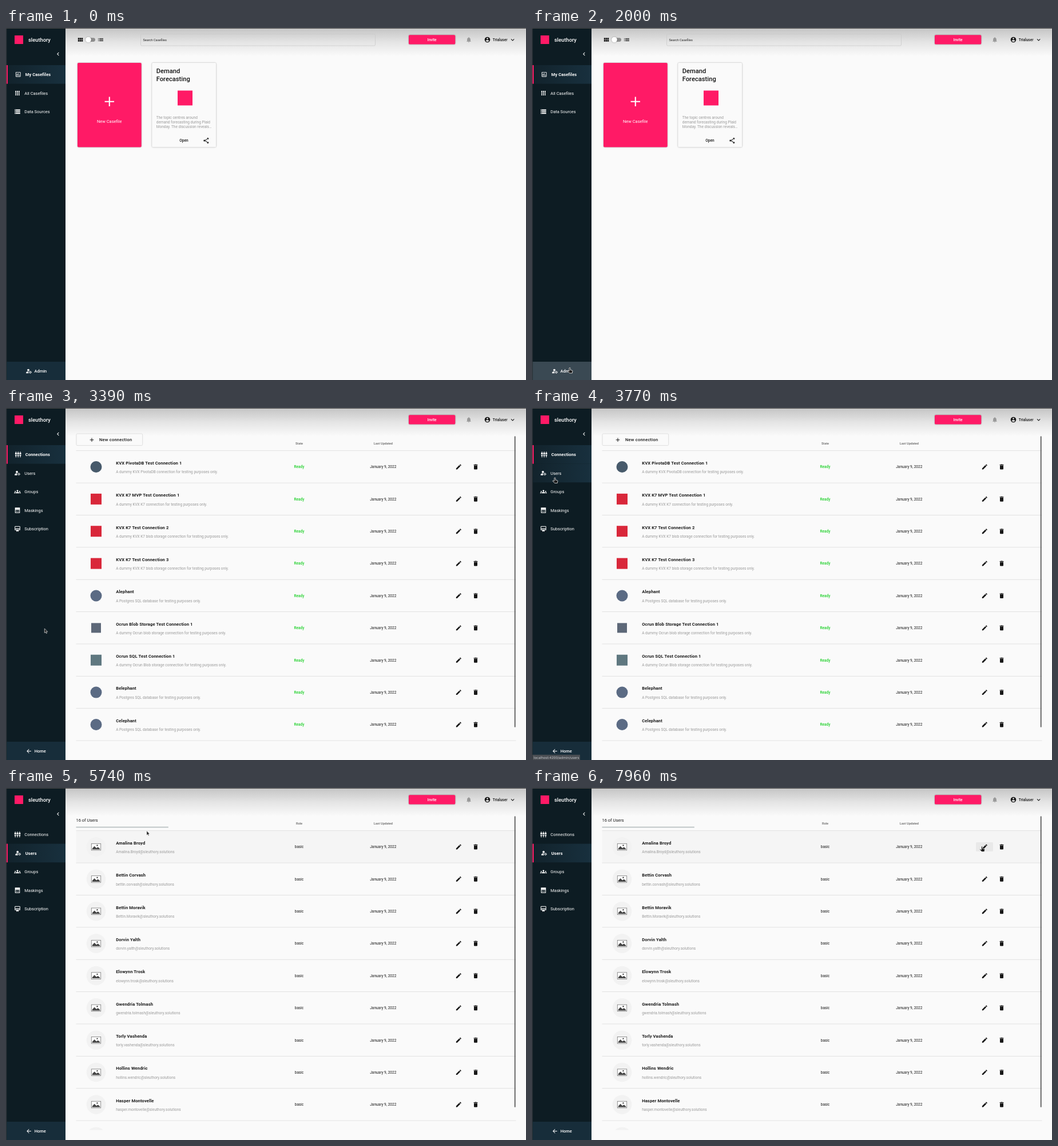
An HTML page for the animation above (8 s loop, 909x616 px).

```html
<!DOCTYPE html>
<html lang="en">
<head>
<meta charset="utf-8">
<title>Admin walkthrough</title>
<style>
html, body { margin: 0; width: 100%; height: 100%; overflow: hidden; background: #fafafa; }
svg { display: block; width: 909px; height: 616px; }
text { font-family: Roboto, sans-serif; white-space: pre; }
.m { font-weight: 500; }
.b { font-weight: 700; }
.mid { text-anchor: middle; }
.mono { font-family: "DejaVu Sans", sans-serif; }
.card { filter: drop-shadow(0 .8px 1.1px rgba(0, 0, 0, .35)); }
</style>
</head>
<body>
<svg id="stage" viewBox="0 0 909 616" xmlns="http://www.w3.org/2000/svg"></svg>
<script>
const LOOP = 8000;
const PINK = '#ff1a66';
const INK = '#161616';
const PITCH = 56.37;
const NAV_TOP = 65, NAV_STEP = 32.6;

// 24-unit icon outlines
const ICONS = {
  chart: 'M19 3H5a2 2 0 0 0-2 2v14a2 2 0 0 0 2 2h14a2 2 0 0 0 2-2V5a2 2 0 0 0-2-2zm0 16H5V5h14zM7 10h2v7H7zM11 7h2v10h-2zM15 13h2v4h-2z',
  apps: 'M4 8h4V4H4zm6 12h4v-4h-4zm-6 0h4v-4H4zm0-6h4v-4H4zm6 0h4v-4h-4zm6-10v4h4V4zm-6 4h4V4h-4zm6 6h4v-4h-4zm0 6h4v-4h-4z',
  storage: 'M2 20h20v-4H2zm2-3h2v2H4zM2 4v4h20V4zm4 3H4V5h2zm-4 7h20v-4H2zm2-3h2v2H4z',
  plugs: 'M5 2c0-.55-.45-1-1-1s-1 .45-1 1v4H1v6h6V6H5zm4 14c0 1.3.84 2.4 2 2.82V23h2v-4.18c1.16-.41 2-1.51 2-2.82v-2H9zm-8 0c0 1.3.84 2.4 2 2.82V23h2v-4.18C6.16 18.4 7 17.3 7 16v-2H1zM21 6V2c0-.55-.45-1-1-1s-1 .45-1 1v4h-2v6h6V6zm-8-4c0-.55-.45-1-1-1s-1 .45-1 1v4H9v6h6V6h-2zm4 14c0 1.3.84 2.4 2 2.82V23h2v-4.18c1.16-.41 2-1.51 2-2.82v-2h-6z',
  person: 'M6 8a4 4 0 1 0 8 0a4 4 0 1 0-8 0zM10.7 13c-3-.1-5.300.6-7.300 1.800C2.500 15.300 2 16.300 2 17.300V20h9.260a7 7 0 0 1-.56-7z',
  groups: 'M2 11a2 2 0 1 0 4 0a2 2 0 1 0-4 0zM5.100 14.100C3.700 13.900 2.300 14.100 1.220 14.600A2 2 0 0 0 0 16.400V18h4.500v-1.600c0-.83.23-1.610.6-2.300zM18 11a2 2 0 1 0 4 0a2 2 0 1 0-4 0zM24 16.400a2 2 0 0 0-1.220-1.800C21.700 14.100 20.300 13.900 18.900 14.100c.4.700.6 1.500.6 2.300V18H24zM16.240 13.650a10.500 10.500 0 0 0-8.480 0A3 3 0 0 0 6 16.400V18h12v-1.600a3 3 0 0 0-1.760-2.750zM9 9a3 3 0 1 0 6 0a3 3 0 1 0-6 0z',
  mask: 'M3 2h18v20H3zM5 10v10h14V10zM6 11h2v2H6zM11 11h2v2h-2zM16 11h2v2h-2zM8 14h2v2H8zM13.500 14h2v2h-2zM6 17h2v2H6zM11 17h2v2h-2zM16 17h2v2h-2z',
  member: 'M20 2H4a2 2 0 0 0-2 2v11a2 2 0 0 0 2 2h4v5l4-2 4 2v-5h4a2 2 0 0 0 2-2V4a2 2 0 0 0-2-2zm0 13H4v-2h16zm0-5H4V4h16z',
  back: 'M20 11H7.830l5.590-5.590L12 4l-8 8 8 8 1.410-1.410L7.830 13H20z',
  left: 'M15.410 7.410L14 6l-6 6 6 6 1.410-1.410L10.830 12z',
  down: 'M16.590 8.590L12 13.170 7.410 8.590 6 10l6 6 6-6z',
  bell: 'M12 22a2 2 0 0 0 2-2h-4a2 2 0 0 0 2 2zm6-6v-5c0-3.070-1.640-5.640-4.500-6.320V4a1.500 1.500 0 0 0-3 0v.68C7.630 5.360 6 7.920 6 11v5l-2 2v1h16v-1z',
  account: 'M12 2a10 10 0 1 0 0 20a10 10 0 1 0 0-20zm0 3a3 3 0 1 1 0 6a3 3 0 1 1 0-6zm0 14.200c-2.500 0-4.710-1.280-6-3.220.03-1.990 4-3.080 6-3.080s5.970 1.090 6 3.080c-1.290 1.940-3.500 3.220-6 3.220z',
  modules: 'M4 11h5V5H4zm0 7h5v-6H4zm6 0h5v-6h-5zm6 0h5v-6h-5zm-6-7h5V5h-5zm6-6v6h5V5z',
  list: 'M3 13h2v-2H3zm0 4h2v-2H3zm0-8h2V7H3zm4 4h14v-2H7zm0 4h14v-2H7zM7 7v2h14V7z',
  share: 'M15 5a3 3 0 1 0 6 0a3 3 0 1 0-6 0zM3 12a3 3 0 1 0 6 0a3 3 0 1 0-6 0zM15 19a3 3 0 1 0 6 0a3 3 0 1 0-6 0zM6.500 11.200L17.500 4.800l1 1.700L7.500 12.900zM6.500 12.800l1-1.700 11 6.400-1 1.700z',
  edit: 'M3 17.250V21h3.750L17.810 9.940l-3.750-3.750zM20.710 7.040a1 1 0 0 0 0-1.410l-2.340-2.340a1 1 0 0 0-1.410 0l-1.830 1.830 3.750 3.750z',
  trash: 'M6 19a2 2 0 0 0 2 2h8a2 2 0 0 0 2-2V7H6zM19 4h-3.500l-1-1h-5l-1 1H5v2h14z'
};

const text = (x, y, str, size, fill, cls = '', extra = '') =>
  `<text x="${x}" y="${y}" font-size="${size}" fill="${fill}" class="${cls}" ${extra}>${str}</text>`;
const rect = (x, y, w, h, fill, extra = '') =>
  `<rect x="${x}" y="${y}" width="${w}" height="${h}" fill="${fill}" ${extra}/>`;
const disc = (x, y, r, fill, extra = '') =>
  `<circle cx="${x}" cy="${y}" r="${r}" fill="${fill}" ${extra}/>`;
const group = (id, body) => `<g id="${id}">${body}</g>`;
const square = (x, y, size, fill) => rect(x - size / 2, y - size / 2, size, size, fill);
const plus = (x, y, r, color, w) =>
  `<path d="M${x - r} ${y}h${2 * r}M${x} ${y - r}v${2 * r}" stroke="${color}" stroke-width="${w}"/>`;

function icon(name, x, y, fill, scale = .48) {
  const gear = name === 'person'
    ? `<g fill="none" stroke="${fill}"><circle cx="17" cy="16" r="2.700" stroke-width="2"/>
       <circle cx="17" cy="16" r="4.200" stroke-width="1.600" stroke-dasharray="2.200 2.198"/></g>` : '';
  return `<g transform="translate(${x} ${y}) scale(${scale}) translate(-12 -12)">
    <path d="${ICONS[name]}" fill="${fill}" fill-rule="${name === 'share' ? 'nonzero' : 'evenodd'}"/>${gear}</g>`;
}

const HOME_NAV = [['chart', 'My Casefiles'], ['apps', 'All Casefiles'], ['storage', 'Data Sources']];
const ADMIN_NAV = [['plugs', 'Connections'], ['person', 'Users'], ['groups', 'Groups'],
  ['mask', 'Maskings'], ['member', 'Subscription']];

function nav(items, active) {
  return items.map(([ic, label], i) => {
    const top = NAV_TOP + i * NAV_STEP, cy = top + 16.2, on = i === active;
    return (on ? rect(1, top, 103, NAV_STEP, 'url(#active)') + rect(1, top, 2, NAV_STEP, PINK) : '') +
      icon(ic, on ? 21.2 : 20, cy, '#fff') +
      text(on ? 33.8 : 32.3, cy + 2.7, label, 7.47, '#fff', on ? 'b' : '', on ? 'letter-spacing=".08"' : '');
  }).join('');
}

const footer = (ic, x, label, tx) => icon(ic, x, 600.5, '#fff') + text(tx, 603.2, label, 7.47, '#fff', 'm');

function row(i, title, sub, state, stateFill, stateCls, mark) {
  const y = 74.7 + i * PITCH, cy = y + 28.3;
  return mark(157.5, cy) +
    text(192.2, y + 24.1, title, 7.6, '#1a1a1a', 'b', 'letter-spacing=".12"') +
    text(192.2, y + 39.5, sub, 6.5, '#9a9a9a') +
    text(512.5, cy + 2.3, state, 6.53, stateFill, 'mid ' + stateCls) +
    text(659.3, cy + 2.3, 'January 9, 2022', 6.53, INK, 'mid') +
    icon('edit', 791.3, cy, INK, .5) + icon('trash', 821, cy, INK, .5) +
    rect(122.5, y + PITCH - .4, 769, .8, '#dcdcdc');
}

const headings = (second) =>
  text(512.5, 63.8, second, 5.6, '#666', 'mid m') +
  text(659.4, 63.8, 'Last Updated', 5.6, '#666', 'mid m') +
  rect(122.5, 74.3, 769, .8, '#dcdcdc');

const bucket = (x, y) => square(x, y, 19, '#d9273a');
const postgres = (x, y) => disc(x, y, 10, '#5b6b84');
const only = ' for testing purposes only.';
const CONNECTIONS = [
  ['KVX PivotaDB Test Connection 1', 'A dummy KVX PivotaDB connection', (x, y) => disc(x, y, 10, '#475a6b')],
  ['KVX K7 MVP Test Connection 1', 'A dummy KVX K7 connection', bucket],
  ['KVX K7 Test Connection 2', 'A dummy KVX K7 blob storage connection', bucket],
  ['KVX K7 Test Connection 3', 'A dummy KVX K7 blob storage connection', bucket],
  ['Alephant', 'A Postgres SQL database', postgres],
  ['Ocrun Blob Storage Test Connection 1', 'A dummy Ocrun blob storage connection', (x, y) => square(x, y, 17, '#5d6878')],
  ['Ocrun SQL Test Connection 1', 'A dummy Ocrun Blob storage connection', (x, y) => square(x, y, 19, '#5f7880')],
  ['Belephant', 'A Postgres SQL database', postgres],
  ['Celephant', 'A Postgres SQL database', postgres]
];

const USERS = ['Amalina Broyd', 'Bettin Corvash', 'Bettin Moravik', 'Dorvin Yalth', 'Elowynn Trosk',
  'Gwendria Tolmash', 'Torly Vashenda', 'Hollins Wendric', 'Hasper Montovelle'];

function mail(name, i) {
  const local = name.replace(' ', '.');
  return (i === 0 || i === 2 ? local : local.toLowerCase()) + '@sleuthory.solutions';
}

const avatar = (x, y) => disc(x, y, 16.8, '#f2f2f2') +
  `<g transform="translate(${x} ${y})"><rect x="-8.200" y="-5.700" width="16.400" height="11.600" fill="#fff" stroke="#777" stroke-width=".8"/>
   <path d="M-6.800 4.600V3L-3-1.300.6 2.200 3.200.2 6.800 3.400V4.600Z" fill="#444"/><circle cx="2" cy="-2.600" r="1.200" fill="#444"/></g>`;

const bubble = (id, x, w, str) => group(id,
  rect(x, 606.8, w, 9.2, '#4a4e53') + text(x + 2, 613.6, str, 5.72, '#c9ccd0', 'mono'));

const home = nav(HOME_NAV, 0) + footer('person', 40, 'Admin', 49.5) +
  icon('modules', 129.8, 20.7, INK, .5) +
  rect(142, 17.2, 14, 6.8, '#8c8c8c', 'rx="3.400"') + disc(144, 20.5, 4.8, '#fff', 'class="card"') +
  icon('list', 165.5, 20.5, INK, .5) +
  rect(235.5, 10.5, 410, 20.5, 'none', 'rx="2" stroke="#cbcbcb" stroke-width=".8"') +
  text(239.4, 22.8, 'Search Casefiles', 5.6, '#222') +
  rect(125, 61, 111.7, 147.6, PINK, 'rx="1.800" class="card"') +
  plus(180.8, 128.7, 8.2, '#fff', 2.1) +
  text(180.7, 166.1, 'New Casefile', 7.47, '#fff', 'mid') +
  rect(255.2, 61, 112, 147.6, '#fafafa', 'rx="1.800" class="card"') +
  text(262.7, 79.3, 'Demand', 11.2, INK, 'm') + text(262.7, 92.8, 'Forecasting', 11.2, INK, 'm') +
  square(313, 122.5, 26, PINK) +
  ['The topic centres around', 'demand forecasting during Plaid', 'Monday. The discussion reveals…']
    .map((s, i) => text(262.8, 159.1 + i * 8, s, 6.53, '#9a9a9a')).join('') +
  text(311, 198.9, 'Open', 6.53, INK, 'mid m') + icon('share', 349.8, 197, INK, .5);

const connections = nav(ADMIN_NAV, 0) + footer('back', 40, 'Home', 49.7) +
  group('connTable',
    rect(122.9, 45, 115.8, 20.6, '#fafafa', 'rx="2" stroke="#d8d8d8" stroke-width=".8"') +
    plus(150, 55.8, 3.3, INK, 1) +
    text(163, 58, 'New connection', 7.47, INK, 'm', 'letter-spacing=".25"') +
    headings('State') +
    CONNECTIONS.map(([t, s, mark], i) => row(i, t, s + only, 'Ready', '#1fd02a', 'm', mark)).join(''));

const users = nav(ADMIN_NAV, 1) + footer('back', 40, 'Home', 49.7) +
  group('userTable',
    text(122.6, 58.6, '16 of Users', 7.47, INK) +
    rect(122.5, 67.7, 161.3, 1.7, '#b7bfc0') + headings('Role') +
    USERS.map((n, i) => row(i, n, mail(n, i), 'basic', INK, '', avatar)).join('') +
    `<g clip-path="url(#fold)">${disc(157.5, 610.3, 16.8, '#f2f2f2')}</g>`);

document.getElementById('stage').innerHTML = `
<defs>
  <linearGradient id="top" x2="0" y2="1"><stop stop-color="#c4c4c4"/><stop offset=".5" stop-color="#e4e4e4"/><stop offset="1" stop-color="#fafafa"/></linearGradient>
  <linearGradient id="active"><stop stop-color="#12232c"/><stop offset="1" stop-color="#18303e"/></linearGradient>
  <clipPath id="fold"><rect width="909" height="598.500"/></clipPath>
</defs>` +
  rect(0, 0, 909, 616, '#fafafa') + rect(104, 0, 805, 49, 'url(#top)') +
  rect(0, 0, 104, 616, '#0d1c23') + rect(0, 0, 1.2, 616, '#30363a') + rect(0, 0, 909, 1, '#444') +
  rect(1.2, 584, 102.8, 32, '#172d3a', 'id="foot"') +
  rect(1.2, 0, 102.8, NAV_STEP, 'url(#active)', 'id="navHover"') +
  rect(122.5, 75.1, 769, 55.7, '#f5f5f5', 'id="rowHover"') +
  rect(776, 95, 30, 16, '#e9e9e9', 'id="editHover" rx="1.500"') +
  square(22.5, 20.5, 15, PINK) + text(39, 23.8, 'sleuthory', 9.33, '#fff', 'm') +
  icon('left', 91, 45.5, '#fff', .5) +
  rect(704, 12.2, 81.3, 16.4, PINK, 'rx="1.900" class="card"') +
  text(744.6, 22.8, 'Invite', 6.53, '#fff', 'mid m') +
  icon('bell', 809, 20.5, '#999') + icon('account', 841.5, 20.5, INK) +
  text(850.8, 22.6, 'Trialuser', 6.53, INK, 'm') + icon('down', 885.6, 20.7, INK, .5) +
  group('home', home) + group('connections', connections) + group('users', users) +
  rect(888.8, 49.5, 1.8, 509, '#5a5a5a', 'id="scroll"') +
  bubble('adminUrl', 844.5, 64.5, 'localhost:4200/admin') +
  bubble('usersUrl', 1, 83, 'localhost:4200/admin/users') +
  group('cursor',
    `<path id="arrow" d="M0 0V7.600L1.800 6l1.200 2.700 1.300-.6L3.100 5.500H5.400Z" fill="#222" stroke="#fff" stroke-width=".6"/>
     <path id="hand" d="M-1 .9a1 1 0 0 1 2 0V4l3 .6c.8.200 1 .7.9 1.400L4.300 9.500h-4.700L-3.600 6.100c-.6-.7.3-1.400 1-1L-1 6Z" fill="#1a1a1a" stroke="#fff" stroke-width=".7"/>`);

const $ = {};
document.querySelectorAll('svg [id]').forEach(el => { $[el.id] = el; });
const show = (el, on) => { el.style.display = on ? '' : 'none'; };

// time, tip x, tip y
const PATH = [
  [670, 62, 612], [1000, 58, 604], [1450, 66, 598], [1500, 66, 598], [1750, 56, 593], [2000, 66, 594.5],
  [2300, 67, 604], [2340, 67, 603], [3120, 67, 603], [3350, 70, 430], [3550, 57, 215], [3770, 40, 122],
  [3940, 39, 119], [4200, 42, 113], [4520, 45, 109.5], [4720, 40, 110], [4800, 38.5, 110], [5610, 38.5, 110],
  [5740, 245, 75.2], [6000, 480, 54], [6390, 795, 98], [6450, 795, 98], [6700, 786, 96], [7000, 792, 104],
  [7240, 786, 100], [7600, 794, 101], [7960, 786.5, 102], [LOOP, 786.5, 102]
];

function tipAt(t) {
  const i = Math.max(1, PATH.findIndex(p => p[0] > t));
  const [t0, x0, y0] = PATH[i - 1], [t1, x1, y1] = PATH[i];
  const k = Math.max(0, (t - t0) / (t1 - t0));
  return [x0 + (x1 - x0) * k, y0 + (y1 - y0) * k];
}

function draw(t) {
  const page = t < 2490 ? 'home' : t < 5020 ? 'connections' : 'users';
  const visible = t >= 670;
  const [x, y] = tipAt(t);
  const side = visible && x < 104;
  const item = Math.floor((y - NAV_TOP) / NAV_STEP);
  const onNav = side && item >= 0 && item < (page === 'home' ? 3 : 5);
  const onFoot = side && y >= 584;
  const onEdit = x >= 776 && x <= 806 && y >= 95 && y <= 111;

  for (const p of ['home', 'connections', 'users']) show($[p], p === page);
  show($.connTable, t >= 2550);
  show($.userTable, t >= 5080);
  show($.scroll, (t >= 2550 && t < 4200) || t >= 5080);
  show($.adminUrl, t >= 2600 && t < 3180);
  show($.usersUrl, t >= 3700 && t < 5080);

  $.foot.setAttribute('fill', onFoot ? '#3a4953' : '#172d3a');
  show($.navHover, onNav);
  $.navHover.setAttribute('y', NAV_TOP + item * NAV_STEP);
  show($.rowHover, page === 'users' && x > 122 && y >= 75 && y < 131);
  show($.editHover, page === 'users' && onEdit);

  const hand = onNav || onFoot || onEdit;
  show($.cursor, visible);
  show($.hand, hand);
  show($.arrow, !hand);
  $.cursor.setAttribute('transform', `translate(${x.toFixed(2)} ${y.toFixed(2)})`);
}

function tick() {
  draw(performance.now() % LOOP);
  requestAnimationFrame(tick);
}
tick();
</script>
</body>
</html>
```
